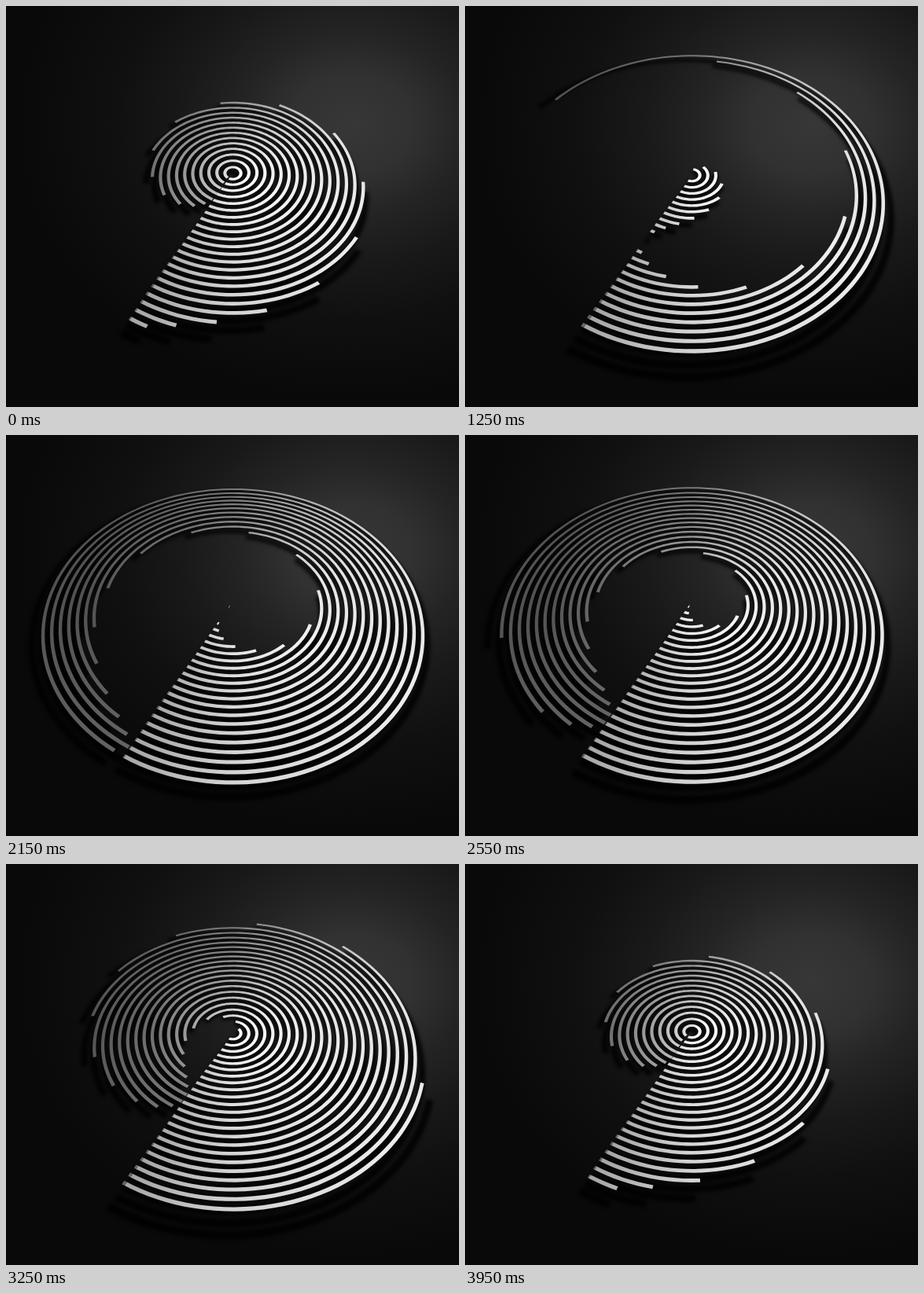
Write an HTML page with a canvas that moves like this. It is 576x510 px and loops after 4000 ms.

```html
<!DOCTYPE html>
<html lang="en">
<head>
<meta charset="utf-8">
<title>Rings</title>
<style>
html, body { margin: 0; width: 100%; height: 100%; overflow: hidden; background: #0a0a0a; }
canvas { display: block; }
</style>
</head>
<body>
<canvas id="stage" width="576" height="510"></canvas>
<script>
const W = 576, H = 510, LOOP = 4000, HALF = 2000, STEP = 50;
const RINGS = 23, R = 234.5, TILT = 0.75, DEPTH = 0.2387;
const CX = 288.5, CY = 211, SEAM = 117.8 * Math.PI / 180;
const LIGHT = { x: 400, y: -15 };

const ctx = document.getElementById('stage').getContext('2d');

function layer(draw) {
  const c = document.createElement('canvas');
  c.width = W;
  c.height = H;
  const g = c.getContext('2d');
  if (draw) draw(g);
  return g;
}

const gray = v => `rgb(${v},${v},${v})`;

function addStops(grad, stops, color) {
  for (const [at, v] of stops) grad.addColorStop(at, color(v));
  return grad;
}

const floor = layer(g => {
  g.fillStyle = gray(9);
  g.fillRect(0, 0, W, H);
  g.translate(440, 150);
  g.scale(1, 0.82);
  g.fillStyle = addStops(g.createRadialGradient(0, 0, 0, 0, 0, 430),
    [[0, 55], [0.18, 49], [0.33, 36], [0.5, 25], [0.7, 16], [1, 9]], gray);
  g.fillRect(-W, -H, 2 * W, 2 * H);
});

// Metal shading: bright on the right, dark past the seam, lighter near the hub
const metal = layer(g => {
  const seamAngle = Math.atan2(199, -138);
  g.fillStyle = addStops(g.createConicGradient(seamAngle, CX, CY),
    [[0, 100], [0.155, 82], [0.29, 84], [0.405, 108], [0.53, 185],
     [0.61, 225], [0.74, 238], [0.905, 212], [1, 165]], gray);
  g.fillRect(0, 0, W, H);
  g.fillStyle = addStops(g.createRadialGradient(CX, CY, 10, CX, CY, 180),
    [[0, 0.8], [0.25, 0.45], [0.55, 0.17], [1, 0]], a => `rgba(255,255,255,${a})`);
  g.fillRect(0, 0, W, H);
});

const bars = layer();
const shade = layer();

// Cubic bezier (.5, 0, .5, 1)
function ease(x) {
  let lo = 0, hi = 1;
  for (let i = 0; i < 24; i++) {
    const s = (lo + hi) / 2, q = 1 - s;
    if (1.5 * s * q * q + 1.5 * s * s * q + s * s * s < x) lo = s; else hi = s;
  }
  return lo * lo * (3 - 2 * lo);
}

// While turning, outer rings rise and inner rings sink (rise in px)
function ringState(k, time) {
  const delay = k ? 100 * (k + 1) : 0;
  const t = (time - delay + 2 * LOOP) % LOOP;
  const x = (t % HALF) / HALF;
  const e = ease(x);
  const r = (RINGS - k) / RINGS;
  return {
    r,
    sweep: (t < HALF ? e : 1 - e) * 2 * Math.PI,
    rise: 10 * (r - 0.52) * Math.sin(Math.PI * Math.pow(x, 1.3)) ** 2
  };
}

function project(r, angle, rise) {
  const y = r * Math.sin(angle), w = (1 + 0.0016 * rise) / (1 - DEPTH * y);
  return [CX + R * r * Math.cos(angle) * w, CY + R * TILT * y * w - rise];
}

function strip(g, ring, width, cast) {
  const n = Math.max(2, Math.ceil(ring.sweep * 24));
  const edge = (r, i) => {
    let [x, y] = project(r, SEAM - ring.sweep * i / n, ring.rise);
    if (cast) {
      x += (x - LIGHT.x) * cast;
      y += (y - LIGHT.y) * cast;
    }
    g.lineTo(x, y);
  };
  g.beginPath();
  for (let i = 0; i <= n; i++) edge(ring.r + width / 2, i);
  for (let i = n; i >= 0; i--) edge(ring.r - width / 2, i);
  g.closePath();
  g.fill();
}

function draw(time) {
  bars.globalCompositeOperation = 'source-over';
  bars.clearRect(0, 0, W, H);
  shade.clearRect(0, 0, W, H);
  bars.fillStyle = '#fff';
  shade.fillStyle = '#000';
  for (let k = 0; k < RINGS; k++) {
    const ring = ringState(k, time);
    if (ring.sweep < 0.006) continue;
    strip(shade, ring, 0.032, 0.04 + 0.007 * ring.rise);
    strip(bars, ring, 0.0175, 0);
  }
  bars.globalCompositeOperation = 'source-atop';
  bars.drawImage(metal.canvas, 0, 0);

  ctx.drawImage(floor.canvas, 0, 0);
  ctx.globalAlpha = 0.8;
  ctx.filter = 'blur(2px)';
  ctx.drawImage(shade.canvas, 0, 0);
  ctx.filter = 'none';
  ctx.globalAlpha = 1;
  ctx.drawImage(bars.canvas, 0, 0);
}

function tick() {
  const time = performance.now() % LOOP;
  draw(Math.floor(time / STEP) * STEP);
  requestAnimationFrame(tick);
}
tick();
</script>
</body>
</html>
```
